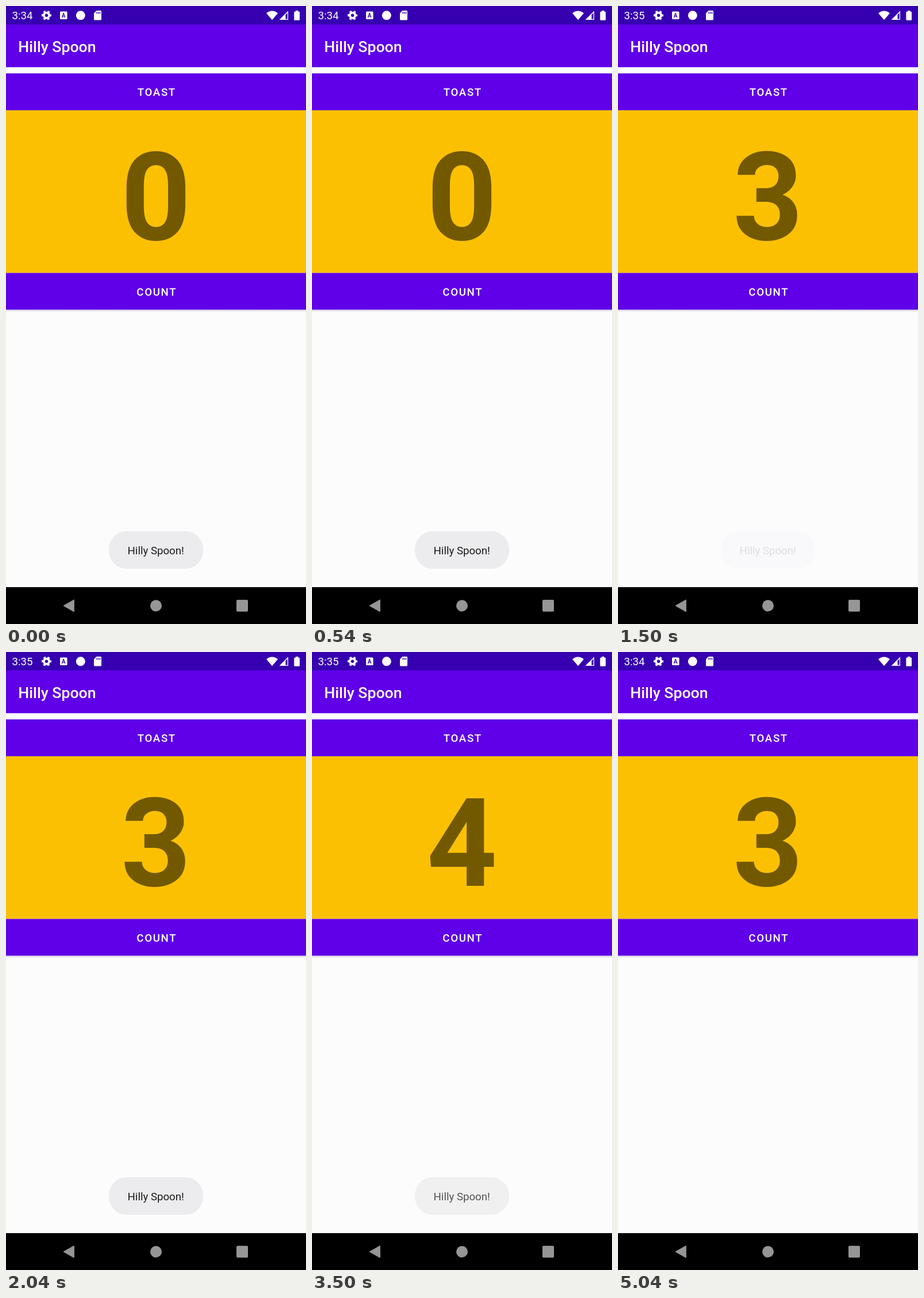
An HTML page for the animation above (5080 ms loop, 522 by 1073 pixels).

```html
<!DOCTYPE html>
<html lang="en">
<head>
<meta charset="utf-8">
<title>Hilly Spoon</title>
<style>
  html, body { margin: 0; width: 100%; height: 100%; overflow: hidden; background: #fcfcfd; }
  svg { display: block; width: 522px; height: 1073px; }
  text { font-family: Roboto, sans-serif; }
  .bar { fill: #5f00e9; }
  .label { font-size: 18.66px; font-weight: 500; letter-spacing: 1.667px; fill: #fff; text-anchor: middle; }
</style>
</head>
<body>
<svg viewBox="0 0 522 1073">
  <defs>
    <linearGradient id="shade" x2="0" y2="1">
      <stop stop-color="#d4d3da"/>
      <stop offset="1" stop-color="#fcfcfd"/>
    </linearGradient>
  </defs>
  <rect width="522" height="1073" fill="#fcfcfd"/>

  <!-- status bar -->
  <rect width="522" height="32" fill="#3600b1"/>
  <g fill="#fff">
    <text id="clock" x="10.5" y="23" font-size="18.66">3:34</text>
    <g transform="translate(70.5 16.2)" fill="none" stroke="#fff">
      <circle r="4.6" stroke-width="3.8"/>
      <circle r="7.2" stroke-width="2.6" stroke-dasharray="3.77" stroke-dashoffset="1.9"/>
    </g>
    <rect x="94" y="9.5" width="12.5" height="13.5" rx="1.5"/>
    <text x="100.2" y="19.5" font-size="10" font-weight="700" text-anchor="middle" fill="#3600b1">A</text>
    <circle cx="129.8" cy="16.3" r="8"/>
    <path d="M157.5 8H164.5Q166 8 166 9.5V23Q166 24.500 164.500 24.500H154.500Q153 24.500 153 23V12.500Z"/>
    <path d="M158.200 10.200v3.400m2.700-3.400v3.400m2.700-3.400v3.400" stroke="#3600b1" stroke-width="1.400"/>
    <path d="M453 12.500Q463 4.500 473 12.500L463 24.300Z"/>
    <path d="M491 8.500V24H475.500Z"/>
    <path d="M486.500 15.200L489.700 12V22.700H486.500Z" fill="#3600b1"/>
    <path d="M504 8h4.500v1.800h1.300q1.200 0 1.200 1.200v12.500q0 1.200-1.200 1.200h-7.300q-1.200 0-1.200-1.200V11q0-1.200 1.200-1.200H504Z"/>
  </g>

  <!-- app bar and buttons -->
  <rect class="bar" y="32" width="522" height="74.500"/>
  <text x="21.300" y="79.700" font-size="26.660" font-weight="500" fill="#fff">Hilly Spoon</text>
  <rect y="106.500" width="522" height="10.500" fill="#fff"/>
  <rect class="bar" y="117" width="522" height="64"/>
  <text class="label" x="262.300" y="156.200">TOAST</text>
  <rect y="181" width="522" height="282.500" fill="#fcc003"/>
  <text id="count" x="261" y="406" font-size="213.300" font-weight="700" text-anchor="middle" fill="#725900">0</text>
  <rect class="bar" y="463.500" width="522" height="64"/>
  <text class="label" x="262.300" y="502.700">COUNT</text>
  <rect y="527.500" width="522" height="4" fill="url(#shade)"/>

  <g id="toast">
    <rect x="179" y="912" width="164" height="65" rx="31" fill="#ececee"/>
    <text x="260.700" y="952" font-size="18.660" text-anchor="middle" fill="#1a1a1a">Hilly Spoon!</text>
  </g>

  <!-- navigation bar -->
  <rect y="1009" width="522" height="64" fill="#000"/>
  <g fill="#969696">
    <path d="M100 1041.300L118.300 1031V1051.600Z" stroke="#969696" stroke-linejoin="round"/>
    <circle cx="261" cy="1041.300" r="10"/>
    <rect x="401" y="1031" width="20" height="20.500" rx="2"/>
  </g>
</svg>
<script>
  const LOOP = 5080;
  // [start ms, clock, count]
  const screens = [
    [0, "3:34", 0],
    [1130, "3:34", 1],
    [1250, "3:34", 2],
    [1330, "3:34", 3],
    [1420, "3:35", 3],
    [2290, "3:35", 4],
    [2670, "3:34", 3],
    [2750, "3:35", 4],
    [5040, "3:34", 3]
  ];
  // [ms, toast opacity]
  const fades = [[0, 1], [1000, 1], [1130, 0], [1460, 0], [1780, 1], [3420, 1], [3740, 0], [LOOP, 0]];
  const flashes = [[2670, 2750], [5040, LOOP]];

  const [clock, count, toast] = ["clock", "count", "toast"].map(id => document.getElementById(id));

  function toastOpacity(t) {
    if (flashes.some(([from, to]) => t >= from && t < to)) return 0;
    const i = fades.findIndex(([at]) => at > t);
    const [t0, a] = fades[i - 1], [t1, b] = fades[i];
    return a + (b - a) * (t - t0) / (t1 - t0);
  }

  function draw(now) {
    const t = now % LOOP;
    const [, time, number] = screens.filter(([at]) => at <= t).pop();
    clock.textContent = time;
    count.textContent = number;
    toast.setAttribute("opacity", toastOpacity(t));
  }

  const start = performance.now();
  function tick() {
    draw(performance.now() - start);
    requestAnimationFrame(tick);
  }
  tick();
</script>
</body>
</html>
```
